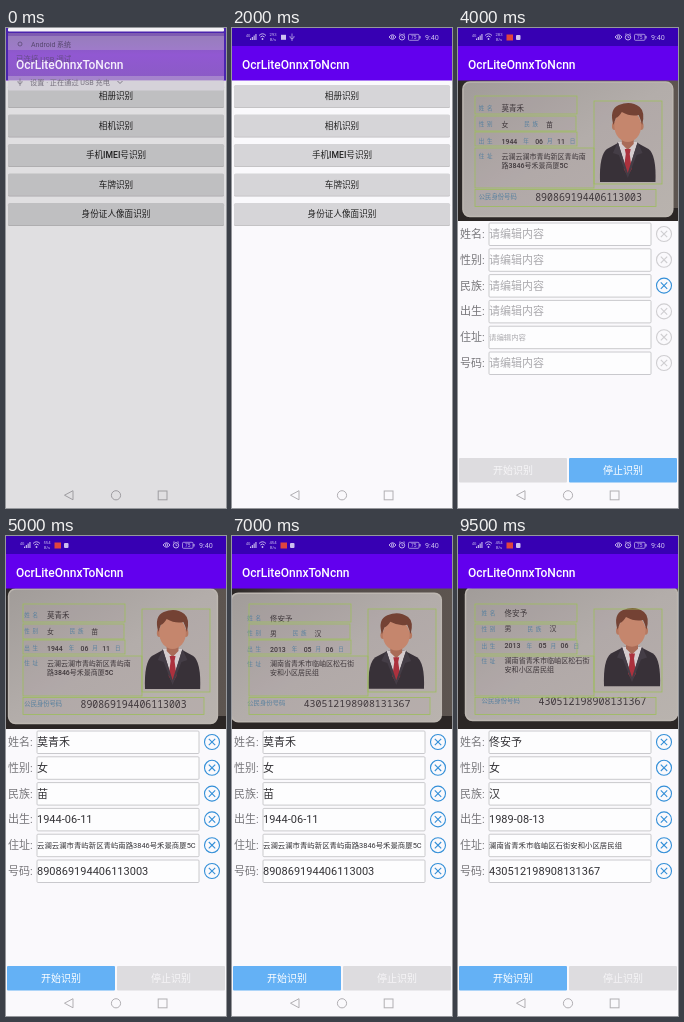
Recreate the animation shown at these times as an HTML page. Size 220 by 480 pixels, loop 10 s.

```html
<!DOCTYPE html>
<html lang="en">
<head>
<meta charset="utf-8">
<title>OcrLiteOnnxToNcnn</title>
<style>
html, body { margin: 0; width: 100%; height: 100%; overflow: hidden; background: #faf9fc; }
svg { display: block; width: 220px; height: 480px; font-family: Roboto, "Noto Sans CJK SC", "Noto Sans CJK", sans-serif; }
text { white-space: pre; }
</style>
</head>
<body>
<svg id="stage" viewBox="0 0 220 480">
  <defs>
    <linearGradient id="desk" x1="0" y1="0" x2="1" y2="0">
      <stop offset="0" stop-color="#2a2625"/><stop offset=".3" stop-color="#4e4845"/><stop offset="1" stop-color="#5d5550"/>
    </linearGradient>
    <linearGradient id="paper" x1="0" y1="0" x2="1" y2="1">
      <stop offset="0" stop-color="#a19c99"/><stop offset=".5" stop-color="#b3adaa"/><stop offset="1" stop-color="#b9b3ae"/>
    </linearGradient>
    <linearGradient id="shade" x1="0" y1="0" x2="0" y2="1">
      <stop offset="0" stop-color="#7d5cae"/><stop offset=".45" stop-color="#9158d2"/><stop offset="1" stop-color="#8a5bc4"/>
    </linearGradient>
    <clipPath id="view"><rect y="52" width="220" height="141"/></clipPath>
  </defs>
  <g id="body"></g>
  <g id="bars"></g>
  <g id="cover"></g>
</svg>
<script>
const LOOP = 10000, STEP = 500;
const el = id => document.getElementById(id);

const rect = (x, y, w, h, fill, extra = "") =>
  `<rect x="${x}" y="${y}" width="${w}" height="${h}" fill="${fill}" ${extra}/>`;
const path = (d, stroke, width = 1, extra = 'fill="none"') =>
  `<path d="${d}" stroke="${stroke}" stroke-width="${width}" ${extra}/>`;
const ring = (x, y, r, stroke, width = 1) =>
  `<circle cx="${x}" cy="${y}" r="${r}" fill="none" stroke="${stroke}" stroke-width="${width}"/>`;
// y is the middle of the line
const text = (x, y, s, size, fill, extra = "") =>
  `<text x="${x}" y="${y + size * 0.36}" font-size="${size}" fill="${fill}" ${extra}>${s}</text>`;
const MID = 'text-anchor="middle"';
const MEDIUM = 'font-weight="500"';

// printed: what the card shows; the other fields: what was recognised
const people = [
  {
    name: "莫青禾", sex: "女", folk: "苗", born: "1944-06-11",
    printed: { sex: "女", date: ["1944", "06", "11"], lines: ["云澜云澜市青屿新区青屿南", "路3846号禾景商厦5C"] },
    address: "云澜云澜市青屿新区青屿南路3846号禾景商厦5C",
    id: "890869194406113003"
  },
  {
    name: "佟安予", sex: "女", folk: "汉", born: "1989-08-13",
    printed: { sex: "男", date: ["2013", "05", "06"], lines: ["澜南省青禾市临岫区松石街", "安和小区居民组"] },
    address: "澜南省青禾市临岫区石街安和小区居民组",
    id: "430512198908131367"
  }
];

// Hand-held drift of the card: time, x, y, x scale, y scale
const drift = [
  [2500, 2, 3, 1, 1],
  [3000, 0, 0, 1, 1],
  [4000, -3, 1, 0.99, 1],
  [5000, -5.3, 0, 0.985, 1],
  [6000, -7, 4, 0.99, 0.97],
  [7000, -8.5, 6.5, 0.99, 0.956],
  [8500, 6.5, 11.5, 0.98, 0.956],
  [9500, -0.5, -1.2, 1, 0.99]
];

function driftAt(t) {
  let i = 0;
  while (i < drift.length - 2 && t > drift[i + 1][0]) i++;
  const a = drift[i], b = drift[i + 1];
  const k = Math.min(1, Math.max(0, (t - a[0]) / (b[0] - a[0])));
  return a.slice(1).map((v, j) => v + (b[j + 1] - v) * k);
}

function statusBar(t) {
  const pale = "#cdc0f0";
  const camera = t >= 2500;
  const speed = t < 2500 ? "293" : t < 4500 ? "283" : t < 5500 ? "554" : "454";
  let s = rect(0, 0, 220, 18, "#3700b3") + rect(0, 18, 220, 34.5, "#6200ee");
  s += text(14, 7.5, "4G", 3.5, pale);
  for (let i = 0; i < 4; i++) s += rect(18 + i * 1.8, 10.5 - i * 1.5, 1.1, 1.5 + i * 1.5, pale);
  s += path("M27 7.5Q30.5 4 34 7.5M28.4 9Q30.5 7 32.6 9", pale, 0.9);
  s += `<circle cx="30.5" cy="11" r=".9" fill="${pale}"/>`;
  s += text(41, 6.8, speed, 4.2, pale, MID) + text(41, 11.6, "B/s", 4, pale, MID);
  if (camera) {
    s += rect(48.5, 6.5, 6.5, 6, "#e0453f") + rect(58, 7, 4.5, 5, pale, 'rx="1"');
  } else {
    s += rect(49, 6.8, 5, 5, pale);
    s += path("M60 5.5V13M58 8V9.5L60 11L62 9.5V8", pale, 0.7);
  }
  s += path("M157 9Q160.5 4.5 164 9Q160.5 13.5 157 9", pale, 0.9) + ring(160.5, 9, 1.2, pale, 0.8);
  s += ring(170, 9.3, 2.7, pale, 0.9) + path("M170 7.7V9.5H171.3M167 6.5L168.4 5.5M173 6.5L171.6 5.5", pale, 0.7);
  s += rect(176.5, 6.3, 10.5, 6, "none", `rx="1" stroke="${pale}" stroke-width=".7"`) + rect(187.5, 8, 1, 2.5, pale);
  s += text(181.7, 9.3, "75", 4.8, pale, MID);
  s += text(193, 9.3, "9:40", 7.2, pale);
  return s + text(10, 36.4, "OcrLiteOnnxToNcnn", 12, "#fff", MEDIUM);
}

const navBar = () =>
  path("M67 462.7V471.8L58.5 467.2Z", "#b1afb3") + ring(110, 467.3, 4.6, "#b1afb3") +
  rect(152.2, 463, 8.8, 8.8, "none", 'stroke="#b1afb3"');

function menuPage() {
  const items = ["相册识别", "相机识别", "手机IMEI号识别", "车牌识别", "身份证人像面识别"];
  return items.map((label, i) => {
    const y = 68 + i * 29.5;
    return rect(2, y - 10.2, 216, 22.3, "#bdbcbf", 'rx="1.5"') +
      rect(2, y - 11, 216, 22.3, "#d6d5d8", 'rx="1.5"') +
      text(110, y, label, 8.6, "#222", `${MID} ${MEDIUM}`);
  }).join("") + navBar();
}

function noticeShade() {
  const ink = "#57476f";
  let s = rect(0, 0, 220, 480, "#000", 'opacity=".105"');
  s += rect(0, 0, 220, 52, "#4a24ad") + rect(2, 5, 216, 48, "url(#shade)");
  s += rect(2, 0, 216, 3.5, "#f4f2f6", 'rx="1"');
  s += rect(2, 8, 216, 14, "#b4a5c8", 'opacity=".45"');
  s += rect(2, 52, 216, 10.5, "#d5d2d9", 'rx="1.5"') + rect(2, 48, 216, 5, "#b7a0d2", 'opacity=".6"');
  s += ring(14, 16, 2, ink, 0.7) + text(25, 16, "Android 系统", 7, ink);
  s += text(10, 31, "已连接 USB 调试", 7.5, ink, 'opacity=".75"');
  s += text(10, 36.4, "OcrLiteOnnxToNcnn", 12, "#f5effc", MEDIUM);
  s += path("M14 50.5V58M12 53V54.5L14 56L16 54.5V53", "#77717f", 0.7);
  s += text(24, 54.3, "设置 · 正在通过 USB 充电", 7.2, "#77717f");
  return s + path("M111.5 53L114 55.5L116.5 53", "#77717f", 0.9);
}

const portrait = () =>
  '<g transform="translate(174.5 0)">' +
  '<path d="M-28 153Q-29 126 -21 120L-8 113H8L21 120Q29 126 28 153Z" fill="#29242a"/>' +
  '<path d="M-10 113L0 145L10 113Z" fill="#dcd6d6"/>' +
  '<path d="M-6 106H6V115L0 121L-6 115Z" fill="#a9664d"/>' +
  '<path d="M-3 120H3L2 125L4 140L0 147L-4 140L-2 125Z" fill="#ad2430"/>' +
  '<path d="M-10 113L-15 124L-9 126L0 149L9 126L15 124L10 113L0 144Z" fill="#37323a"/>' +
  '<ellipse cx="-13.5" cy="97" rx="2.5" ry="4" fill="#b97658"/><ellipse cx="13.5" cy="97" rx="2.5" ry="4" fill="#b97658"/>' +
  '<ellipse cy="97" rx="13.5" ry="16" fill="#c98566"/>' +
  '<path d="M-14.5 96Q-19 80 -9 76Q3 71 12 78Q18 83 14.5 96Q13 90 11 86Q3 88 -6 83Q-9 88 -12 89Z" fill="#6d3826"/></g>';

function idCard(t) {
  const p = people[t < 6000 ? 0 : 1];
  const [x, y, sx, sy] = driftAt(t);
  const blue = "#4c7f9f", ink = "#302b2d";
  const label = (lx, ly, s) => text(lx, ly, s, 5.6, blue, MEDIUM);
  const value = (vx, vy, s, size = 7.6) => text(vx, vy, s, size, ink, MEDIUM);
  const [yr, mo, day] = p.printed.date;
  const [line1, line2] = p.printed.lines;
  let s = rect(8, 53, 212, 134.5, "url(#paper)", 'rx="7" stroke="#bdb7b1" stroke-width="1.5"');
  s += label(24, 79, "姓  名") + value(47, 79, p.name);
  s += label(24, 95, "性  别") + value(47, 95, p.printed.sex, 7) + label(70, 95, "民  族") + value(92, 95, p.folk, 7);
  s += label(24, 112, "出  生") + value(47, 112, yr, 7) + label(69, 112, "年") + value(81, 112, mo, 7) +
    label(93, 112, "月") + value(103, 112, day, 7) + label(116, 112, "日");
  s += label(24, 127, "住  址") + value(47, 127, line1, 7.1) + value(47, 136, line2, 7.1);
  s += text(24, 168, "公民身份号码", 6.4, blue, MEDIUM);
  s += text(81, 168.5, p.id, 10, ink, `font-family="Noto Sans Mono, monospace" ${MEDIUM}`);
  return `<g transform="matrix(${sx} 0 0 ${sy} ${x} ${y})">${s}${portrait()}</g>`;
}

function cameraView(t) {
  const boxes = [[17, 68, 102, 18], [17, 88, 101, 15], [17, 104, 102, 14], [17, 120, 119, 40], [17, 161.5, 181, 17], [136, 73, 68, 83]];
  const frame = boxes.map(b => rect(...b, "#a08a9a", 'fill-opacity=".12" stroke="#9dbd5c" stroke-width=".8"')).join("");
  return `<g clip-path="url(#view)">${rect(0, 52, 220, 141, "url(#desk)")}${rect(0, 180, 220, 13, "#2b2625")}${idCard(t)}${frame}</g>`;
}

function form(t) {
  const busy = t < 4500 || (t >= 7500 && t < 9000);
  const p = t < 4500 ? null : people[t < 9000 ? 0 : 1];
  const rows = [["姓名:", "name"], ["性别:", "sex"], ["民族:", "folk"], ["出生:", "born"], ["住址:", "address"], ["号码:", "id"]];
  let s = "";
  rows.forEach(([label, key], i) => {
    const y = 206 + i * 25.8;
    const live = !busy || key === "folk";
    const tone = live ? "#338fd8" : "#cfced1";
    s += text(2, y, label, 11, "#77767a");
    s += rect(31, y - 11, 162, 22.5, "#fdfdfe", 'rx="1" stroke="#c5c4c8" stroke-width=".9"');
    s += text(31, y, p ? p[key] : "请编辑内容", key === "address" ? 7.4 : 11, !p ? "#aaa9ad" : busy ? "#bbbabd" : "#333236");
    s += ring(206, y, 7.5, tone, 1.1);
    s += path(`M202.8 ${y - 3.2}l6.4 6.4m0 -6.4l-6.4 6.4`, tone, 1.1);
  });
  const button = (x, label, on) => rect(x, 430, 108, 24.5, on ? "#64b1f5" : "#dddcdf", 'rx="1"') +
    text(x + 54, 442, label, 10, on ? "#fff" : "#f6f5f7", `${MID} ${MEDIUM}`);
  return s + button(1, "开始识别", !busy) + button(111, "停止识别", busy);
}

let shown = -1;
function draw(now) {
  const t = Math.floor((now % LOOP) / STEP) * STEP;
  if (t !== shown) {
    shown = t;
    el("body").innerHTML = t < 2500 ? menuPage() : cameraView(t) + form(t) + navBar();
    el("bars").innerHTML = statusBar(t);
    el("cover").innerHTML = t < 500 ? noticeShade() : "";
  }
  requestAnimationFrame(draw);
}
draw(0);
</script>
</body>
</html>
```
